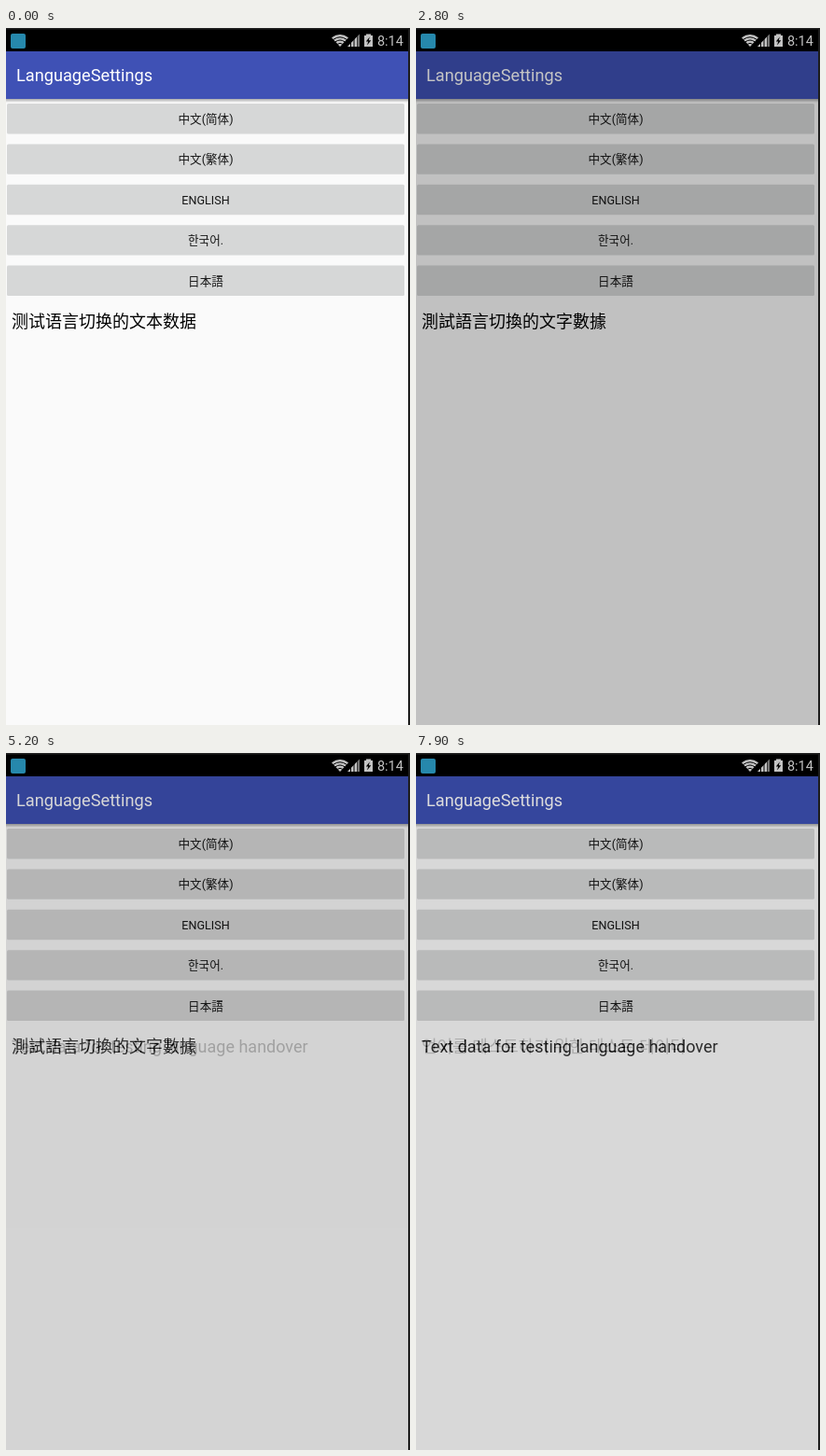
Recreate the animation shown at these times as an HTML page. Size 433 by 747 pixels, loop 8 s.

```html
<!DOCTYPE html>
<html lang="en">
<head>
<meta charset="utf-8">
<title>LanguageSettings</title>
<style>
  html, body { margin: 0; width: 100%; height: 100%; overflow: hidden; background: #000; }
  svg { display: block; width: 100%; height: 100%; }
  text { font-family: Roboto, "Noto Sans CJK SC", "Noto Sans CJK", sans-serif; }
  .tc { font-family: Roboto, "Noto Sans CJK TC", "Noto Sans CJK", sans-serif; }
  .ja { font-family: Roboto, "Noto Sans CJK JP", "Noto Sans CJK", sans-serif; }
  .ko { font-family: Roboto, "Noto Sans CJK KR", "Noto Sans CJK", sans-serif; }
  .title { font-size: 18.2px; fill: #fff; }
  .btn { font-size: 12.6px; fill: #161616; text-anchor: middle; }
  .label { font-size: 18px; fill: #000; }
  .clock { font-size: 14.4px; fill: #c4c4c4; }
</style>
</head>
<body>
<svg viewBox="0 0 433 747" preserveAspectRatio="none">
  <defs>
    <linearGradient id="shade" x2="0" y2="1">
      <stop offset="0" stop-opacity=".32"/>
      <stop offset="1" stop-opacity="0"/>
    </linearGradient>
  </defs>
  <rect width="433" height="747"/>
  <g id="stage"></g>
  <rect width="433" height="1.5" fill="#222"/>
  <rect x="431" width="2" height="747" fill="#1c1c1c"/>
  <rect x="5" y="6" width="16" height="16" rx="2" fill="#2688ac"/>
  <g fill="#c4c4c4">
    <path d="M358 20L349 10.2Q358 3.6 367 10.2Z"/>
    <path d="M366 20L376 9.5V20Z"/>
    <path d="M376.5 9L379 6.5V20H376.5Z" fill="#777"/>
    <path d="M386 8V6.5H391V8H393V20H384V8Z"/>
  </g>
  <g fill="none" stroke="#000" stroke-width="1">
    <path d="M350.8 12.4Q358 7.2 365.2 12.4M353 14.8Q358 11.2 363 14.8M355.3 17.3Q358 15.3 360.7 17.3"/>
    <path d="M369.5 15V20M373 11.5V20"/>
  </g>
  <path d="M389.8 9.5L385.8 14.6H388.2L387 18.5L391.3 13.2H388.8Z"/>
  <text class="clock" x="398" y="19">8:14</text>
</svg>
<script>
const NS = 'http://www.w3.org/2000/svg';
const LOOP = 8000, STEP = 100;

const buttons = [
  ['中文(简体)', 'sc'], ['中文(繁体)', 'sc'], ['ENGLISH', 'en'],
  ['한국어.', 'ko'], ['日本語', 'ja']
];
const labels = [
  ['测试语言切换的文本数据', 'sc'],
  ['測試語言切換的文字數據', 'tc'],
  ['Text data for testing language handover', 'en'],
  ['언어를 테스트하기 위한 테스트 데이터', 'ko']
];
const presses = [
  { row: 1, from: 1300, to: 1400 },
  { row: 2, from: 3900, to: 4200 },
  { row: 3, from: 6600, to: 6900 }
];
// Each switch cross-fades to the next label; lag is in steps.
const switches = [
  { from: 2200, to: 3000, lag: 0.2 },
  { from: 5000, to: 5700, lag: 0 },
  { from: 7700, to: 8500, lag: 0.2 }
];

function add(parent, tag, attrs, text) {
  const el = document.createElementNS(NS, tag);
  for (const key in attrs) el.setAttribute(key, attrs[key]);
  if (text) el.textContent = text;
  return parent.appendChild(el);
}

function makeScreen([label, lang]) {
  const g = add(document.getElementById('stage'), 'g', {});
  add(g, 'rect', { y: 25, width: 431, height: 722, fill: '#fafafa' });
  add(g, 'rect', { y: 25, width: 431, height: 51, fill: '#3f51b5' });
  add(g, 'rect', { y: 76, width: 431, height: 4, fill: 'url(#shade)' });
  add(g, 'text', { class: 'title', x: 11, y: 57 }, 'LanguageSettings');
  const rows = buttons.map(([name, cls], i) => {
    const y = 81 + 43.4 * i;
    const box = add(g, 'rect', { x: 1, y, width: 426, height: 32.4, rx: 1.5 });
    add(g, 'text', { class: 'btn ' + cls, x: 214, y: y + 21 }, name);
    return box;
  });
  add(g, 'text', { class: 'label ' + lang, x: 6, y: 321 }, label);
  return { g, rows };
}

const screens = labels.map(makeScreen);
const clamp = v => Math.min(1, Math.max(0, v));

function fadeIn(p) {
  const x = clamp(p / 8);
  return 0.55 * x * x * (3 - 2 * x) + 0.45 * x;
}

function fadeOut(p) {
  return 1 - Math.pow(clamp(p / 5), 1.8);
}

function render(time) {
  const t = Math.floor(time / STEP) * STEP;
  const current = switches.filter(s => t >= s.to).length;
  const alpha = screens.map((_, i) => i === current ? 1 : 0);
  const active = switches[current];
  if (active && t >= active.from) {
    const p = (t - active.from) / STEP - active.lag;
    alpha[current] = fadeOut(p);
    alpha[current + 1] = fadeIn(p);
  }
  const press = presses.find(b => t >= b.from && t < b.to);
  screens.forEach(({ g, rows }, i) => {
    g.setAttribute('opacity', alpha[i]);
    g.setAttribute('display', alpha[i] > 0 ? 'inline' : 'none');
    rows.forEach((box, r) =>
      box.setAttribute('fill', press && press.row === r ? '#b9bbba' : '#d6d7d7'));
  });
}

const start = performance.now();
function tick() {
  render((performance.now() - start) % LOOP);
  requestAnimationFrame(tick);
}
tick();
</script>
</body>
</html>
```
